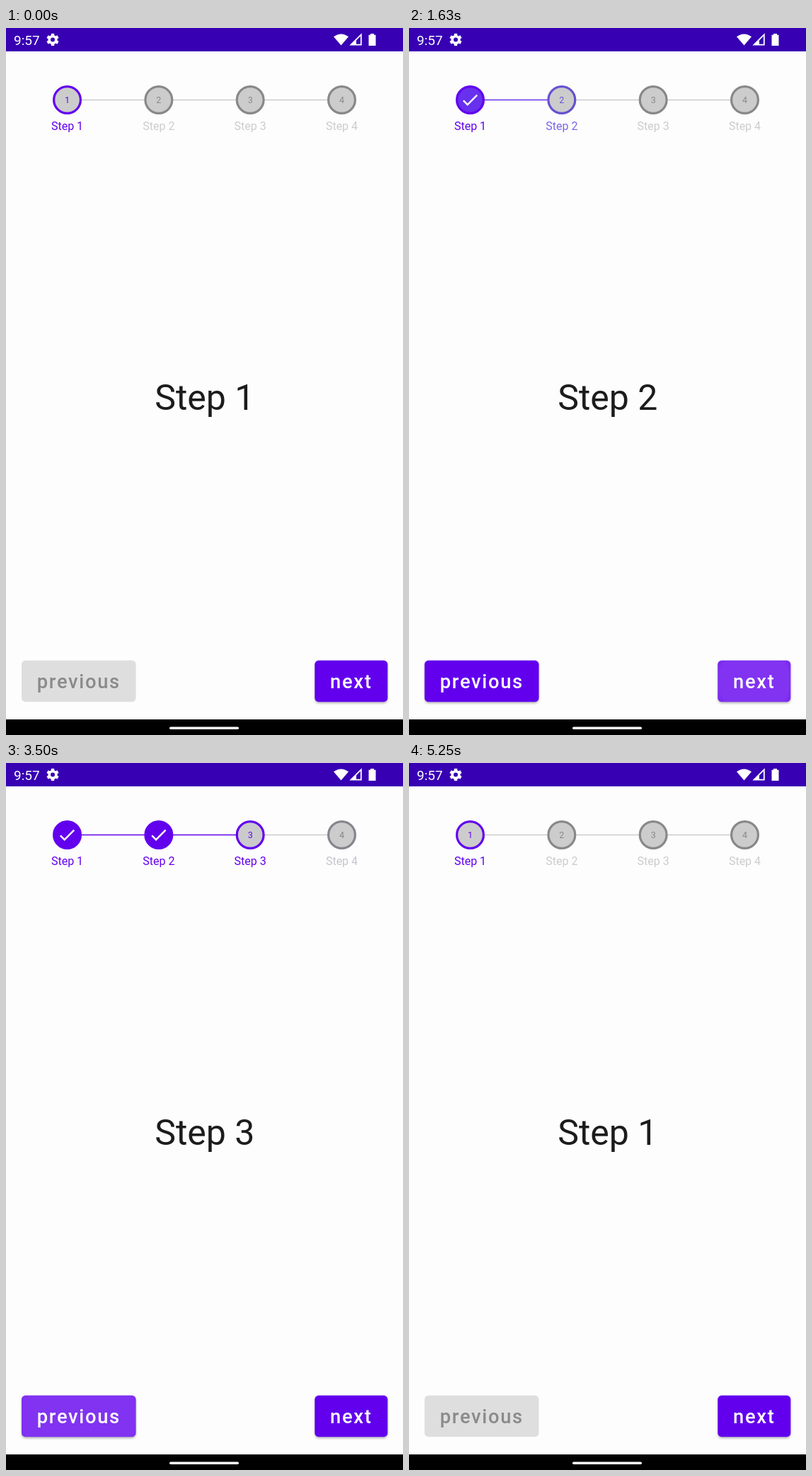
Animation, 561 px wide and 998 px high, one loop 5290 ms. Source, as an HTML page:

```html
<!DOCTYPE html>
<html lang="en">
<head>
<meta charset="utf-8">
<title>Stepper</title>
<style>
  html, body { margin: 0; width: 100%; height: 100%; overflow: hidden; background: #fdfdfd; }
  svg { display: block; width: 100%; height: 100%; }
  text { font-family: Roboto, Arial, sans-serif; }
  .mid { text-anchor: middle; }
  .label { font-size: 16px; }
  .num { font-size: 12.5px; }
  .title { font-size: 50px; fill: #1c1c1c; }
  .caption { font-size: 27.3px; font-weight: 500; letter-spacing: 1.7px; }
  .button { filter: drop-shadow(0 2px 1.5px rgba(0, 0, 0, .28)); }
</style>
</head>
<body>
<svg id="stage" viewBox="0 0 561 998">
  <defs>
    <radialGradient id="glow">
      <stop offset=".6" stop-color="#fff"/>
      <stop offset="1" stop-color="#fff" stop-opacity="0"/>
    </radialGradient>
  </defs>
  <rect width="561" height="998" fill="#fdfdfd"/>
  <rect width="561" height="33" fill="#3700b3"/>
  <g fill="#fff">
    <text x="11" y="24" font-size="19">9:57</text>
    <g id="gear" transform="translate(66 16.5)" stroke="#fff">
      <circle r="4.8" fill="none" stroke-width="3.6"/>
    </g>
    <path d="M463 12.3Q473.5 4.500 484 12.3L473.500 24.500Z"/>
    <path d="M487.500 23.600H501.800V9.300Z" fill="none" stroke="#fff" stroke-width="1.800"/>
    <path d="M487 24L495 16V24Z"/>
    <path d="M515 8H520V9.800H522.500V25H512.500V9.800H515Z"/>
  </g>
  <g id="steps"></g>
  <text id="title" class="title mid" x="280.800" y="539"></text>
  <g id="buttons"></g>
  <rect y="976" width="561" height="22" fill="#000"/>
  <rect x="231" y="986.500" width="98" height="3.400" rx="1.700" fill="#fff"/>
</svg>
<script>
const LOOP = 5290, LAG = 45, PRESS = 90;
const FORWARD = [1525, 1890, 2251];   // moment each step is completed
const BACK = [4410, 3870, 3334];      // moment it is undone again
const PURPLE = '#6200ee', GRAY = '#888', LIGHT = '#ccc';
const CY = 101.5, GAP = 129.33;

const byId = id => document.getElementById(id);
const clamp = v => Math.min(1, Math.max(0, v));

function add(parent, tag, attrs, text) {
  const node = document.createElementNS('http://www.w3.org/2000/svg', tag);
  for (const key in attrs) node.setAttribute(key, attrs[key]);
  if (text) node.textContent = text;
  return parent.appendChild(node);
}

for (let a = 0; a < 360; a += 60)
  add(byId('gear'), 'path', { d: 'M0 -5V-8.6', 'stroke-width': 4.4, transform: `rotate(${a})` });

const steps = [0, 1, 2, 3].map(i => {
  const g = byId('steps'), x = 86.5 + i * GAP;
  return {
    line: i < 3 && add(g, 'path', { d: `M${x + 20} ${CY}H${x + GAP - 20}` }),
    ring: add(g, 'circle', { cx: x, cy: CY, r: 18.9, 'stroke-width': 3.2 }),
    num: add(g, 'text', { class: 'num mid', x, y: 106.3 }, String(i + 1)),
    check: add(g, 'path', {
      d: 'M9 16.17 4.83 12l-1.42 1.41L9 19 21 7l-1.41-1.41z', fill: '#fff',
      transform: `translate(${x - 14.6} ${CY - 14.4}) scale(1.2)`
    }),
    label: add(g, 'text', { class: 'label mid', x, y: 144 }, 'Step ' + (i + 1))
  };
});

function makeButton(name, x, w, clicks, reach) {
  const g = byId('buttons'), box = { x, y: 892.8, width: w, height: 58.4, rx: 5.4 };
  add(add(byId('stage').querySelector('defs'), 'clipPath', { id: name }), 'rect', box);
  const base = add(g, 'rect', box);
  const text = add(g, 'text', { class: 'caption', x: x + 21.8, y: 932 }, name);
  const waves = add(g, 'g', { 'clip-path': `url(#${name})` });
  const ripples = clicks.map(click => ({
    start: click - PRESS, reach,
    dot: add(waves, 'circle', { cx: x + w / 2, cy: 922, fill: 'url(#glow)' })
  }));
  return { base, text, ripples };
}
const previous = makeButton('previous', 22, 161.5, BACK, 150);
const next = makeButton('next', 436.3, 103, FORWARD, 105);

// Critically damped spring, stiffness 1500
function spring(ms) {
  const k = Math.max(0, ms) * Math.sqrt(1500) / 1000;
  return 1 - (1 + k) * Math.exp(-k);
}
const between = (t, from, to) => spring(t - from) - spring(t - to);
const mix = (from, p) => `color-mix(in oklab, ${from}, ${PURPLE} ${(100 * clamp(p)).toFixed(2)}%)`;

function drawButton(button, enabled, t) {
  button.base.setAttribute('class', enabled ? 'button' : '');
  button.base.style.fill = enabled ? PURPLE : '#dedede';
  button.text.style.fill = enabled ? '#fff' : '#8a8a8a';
  for (const { start, reach, dot } of button.ripples) {
    const age = t - start;
    const grow = 1 - (1 - clamp(age / 450)) ** 2;
    dot.setAttribute('r', reach * (.3 + .7 * grow));
    dot.style.opacity = .2 * clamp(age / 75) * (1 - clamp((age - 450) / 375));
  }
}

function draw(t) {
  const current = FORWARD.filter((from, i) => t >= from && t < BACK[i]).length;
  steps.forEach((s, i) => {
    const done = i < 3 ? between(t, FORWARD[i], BACK[i]) : 0;
    const reached = i ? between(t - LAG, FORWARD[i - 1], BACK[i - 1]) : 1;
    s.ring.style.fill = mix(LIGHT, done);
    s.ring.style.stroke = s.num.style.fill = mix(GRAY, reached);
    s.label.style.fill = mix(LIGHT, reached);
    s.num.style.display = i < current ? 'none' : '';
    s.check.style.display = i < current ? '' : 'none';
    if (s.line) {
      s.line.style.stroke = mix(LIGHT, done);
      s.line.style.strokeWidth = 1.7;
    }
  });
  byId('title').textContent = 'Step ' + (current + 1);
  drawButton(previous, current > 0, t);
  drawButton(next, current < 3, t);
}

const began = performance.now();
function tick() {
  draw((performance.now() - began) % LOOP);
  requestAnimationFrame(tick);
}
tick();
</script>
</body>
</html>
```
